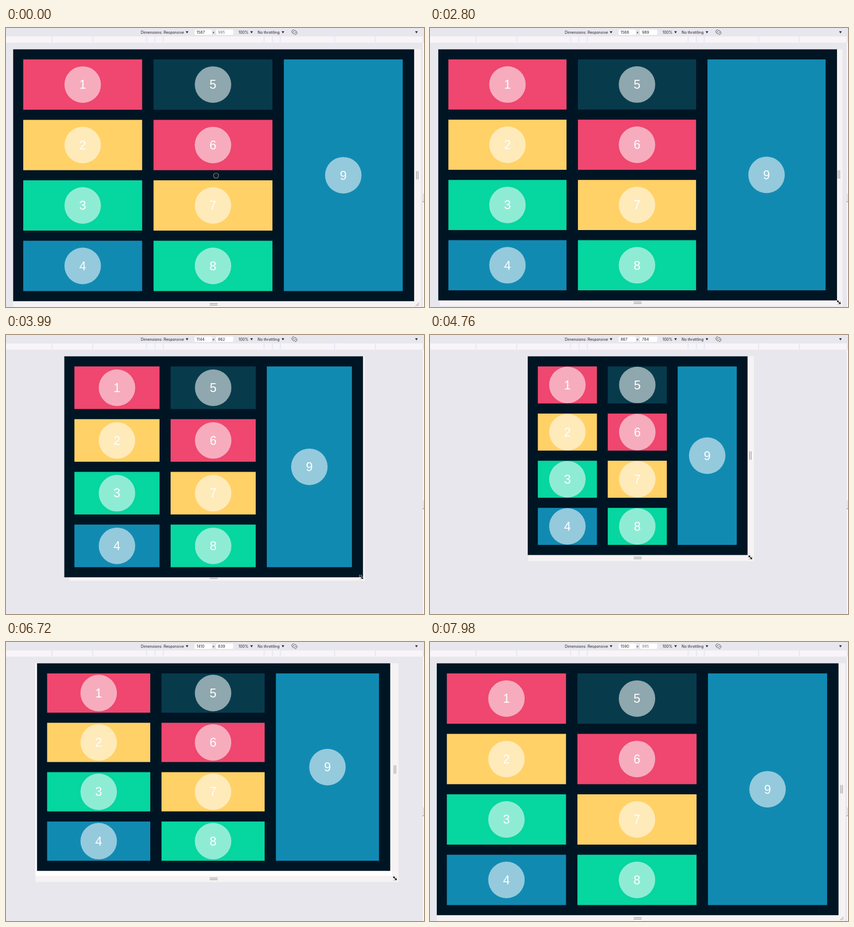
An HTML page with a canvas that plays this animation: 800x533 px, repeating every 8000 ms.

```html
<!DOCTYPE html>
<html lang="en">
<head>
<meta charset="utf-8">
<style>
  html, body { margin: 0; overflow: hidden; background: #e8e7ee; }
  canvas { display: block; }
</style>
</head>
<body>
<canvas id="stage"></canvas>
<script>
const canvas = document.getElementById('stage');
const ctx = canvas.getContext('2d');
const ratio = window.devicePixelRatio || 1;
canvas.width = 800 * ratio;
canvas.height = 533 * ratio;
canvas.style.width = '800px';
canvas.style.height = '533px';

const LOOP = 8000, STEP = 70;
const SCALE = 0.4836, CENTER = 397.4, TOP = 40.7, PAD = 40 * SCALE;
const PINK = '#ef476f', YELLOW = '#ffd166', GREEN = '#06d6a0', BLUE = '#118ab2', TEAL = '#073b4c';
const COLORS = [PINK, YELLOW, GREEN, BLUE, TEAL, PINK, YELLOW, GREEN, BLUE];
const TICKS = [88, 166, 269, 285, 301, 494, 510, 525, 629, 707];

// Drag path: time, width, height, then the speed of each per step
const DRAG = [
  [2590, 1587, 995, 0, 0],
  [3430, 1398, 937, -19, -6],
  [4760, 867, 784, 0, 0],
  [5880, 1112, 653, 14, -2],
  [6720, 1410, 839, 8, 18],
  [7560, 1590, 995, 0, 0]
];

function hermite(p, q, m, n, u) {
  const v = 1 - u;
  return p * (1 + 2 * u) * v * v + m * u * v * v + q * u * u * (3 - 2 * u) - n * u * u * v;
}

function sizeAt(t) {
  const last = DRAG[DRAG.length - 1];
  t = Math.min(Math.max(t, DRAG[0][0]), last[0]);
  const i = Math.max(1, DRAG.findIndex(k => t <= k[0]));
  const a = DRAG[i - 1], b = DRAG[i];
  const span = b[0] - a[0], u = (t - a[0]) / span, steps = span / STEP;
  const [w, h] = [1, 2].map(j => hermite(a[j], b[j], a[j + 2] * steps, b[j + 2] * steps, u));
  return { w: Math.round(w), h: Math.round(h) };
}

function rect(x, y, w, h, color) {
  ctx.fillStyle = color;
  ctx.fillRect(x, y, w, h);
}

function path(color, width, ...lines) {
  ctx.strokeStyle = color;
  ctx.lineWidth = width;
  ctx.beginPath();
  for (const [x1, y1, x2, y2] of lines) {
    ctx.moveTo(x1, y1);
    ctx.lineTo(x2, y2);
  }
  ctx.stroke();
}

function label(text, x, color = '#222') {
  ctx.font = '7.2px Inter, sans-serif';
  ctx.textAlign = 'left';
  ctx.textBaseline = 'alphabetic';
  ctx.fillStyle = color;
  ctx.fillText(text, x, 10.6);
}

function caret(x) {
  ctx.fillStyle = '#222';
  ctx.beginPath();
  ctx.moveTo(x - 2.5, 6.2);
  ctx.lineTo(x + 2.5, 6.2);
  ctx.lineTo(x, 10.3);
  ctx.fill();
}

function input(x, text, color) {
  ctx.fillStyle = '#fff';
  ctx.beginPath();
  ctx.roundRect(x, 3, 33, 10, 2);
  ctx.fill();
  label(text, x + 3.8, color);
}

function rotateIcon() {
  ctx.save();
  ctx.translate(552, 8);
  ctx.rotate(Math.PI / 4);
  ctx.strokeStyle = '#444';
  ctx.lineWidth = 0.9;
  ctx.strokeRect(-1.8, -3.6, 3.6, 7.2);
  for (const start of [-0.9, Math.PI - 0.9]) {
    ctx.beginPath();
    ctx.arc(0, 0, 5, start, start + 1.5);
    ctx.stroke();
  }
  ctx.restore();
}

function toolbar(size) {
  rect(0, 0, 800, 533, '#e8e7ee');
  rect(0, 16, 798, 12, '#f8f4f7');
  for (const x of TICKS) rect(x - 0.5, 16, 1, 11, '#cfe0f8');
  rect(798, 28, 2, 505, '#fbfafc');
  rect(797.5, 316, 2.5, 16, '#e4e3ea');
  rect(797, 331.5, 3, 1, '#888');
  label('Dimensions: Responsive', 258);
  caret(346.5);
  input(361, size.w, '#222');
  label('×', 394.8);
  input(402, size.h, size.h >= 995 ? '#777' : '#222');
  label('100%', 445);
  caret(470);
  label('No throttling', 481.5);
  caret(530);
  rotateIcon();
  caret(785.5);
}

function frame(w, h) {
  const left = CENTER - w / 2, right = left + w, bottom = TOP + h, mid = TOP + h / 2;
  rect(left, TOP, w + 13, h + 12, '#f7f2f3');
  rect(left, TOP, w, h, '#fff');
  path('#888', 1,
    [right + 4.5, mid - 8, right + 4.5, mid + 8],
    [right + 7.5, mid - 8, right + 7.5, mid + 8],
    [CENTER - 7.5, bottom + 4.5, CENTER + 7.5, bottom + 4.5],
    [CENTER - 7.5, bottom + 7.5, CENTER + 7.5, bottom + 7.5],
    [right + 3, bottom + 9.5, right + 9.5, bottom + 3],
    [right + 6.5, bottom + 9.5, right + 9.5, bottom + 6.5]);
}

function page(w, h) {
  const left = CENTER - w / 2;
  const pitchX = (w - PAD) / 3, pitchY = (h - PAD) / 4;
  const cellW = (w - PAD) * 0.33 - PAD;
  rect(left, TOP, w, h, '#001524');
  COLORS.forEach((color, i) => {
    const x = left + PAD + Math.floor(i / 4) * pitchX;
    const y = TOP + PAD + (i % 4) * pitchY;
    const cellH = (i === 8 ? h - PAD : pitchY) - PAD;
    const cx = x + cellW / 2, cy = y + cellH / 2;
    rect(x, y, cellW, cellH, color);
    ctx.fillStyle = 'rgba(255,255,255,.55)';
    ctx.beginPath();
    ctx.arc(cx, cy, 34.9, 0, 7);
    ctx.fill();
    ctx.fillStyle = '#fff';
    ctx.font = '23.5px "Liberation Sans", Arial, sans-serif';
    ctx.textAlign = 'center';
    ctx.fillText(i + 1, cx, cy + 8.3);
  });
}

function resizeCursor(x, y, angle) {
  ctx.save();
  ctx.translate(x, y);
  ctx.rotate(angle);
  ctx.beginPath();
  ctx.moveTo(-5, 0);
  for (const [px, py] of [[-2, -2.6], [-2, -0.7], [2, -0.7], [2, -2.6], [5, 0],
                          [2, 2.6], [2, 0.7], [-2, 0.7], [-2, 2.6]]) ctx.lineTo(px, py);
  ctx.closePath();
  ctx.strokeStyle = '#fff';
  ctx.lineWidth = 1;
  ctx.stroke();
  ctx.fillStyle = '#111';
  ctx.fill();
  ctx.restore();
}

function ease(t, from, to) {
  const u = Math.min(1, Math.max(0, (t - from) / (to - from)));
  return u * u * (3 - 2 * u);
}

function cursor(t, w, h) {
  if (t > 7630) return;
  const cornerX = CENTER + w / 2 + 6, cornerY = TOP + h + 5;
  if (t >= 2100) {
    const u = ease(t, 2030, 2380);
    resizeCursor(800 + (cornerX - 800) * u, 522 + (cornerY - 522) * u, Math.PI / 4);
    return;
  }
  const u = ease(t, 0, 420), x = 402 + 398 * u, y = 282 + 240 * u;
  if (x > 781) return resizeCursor(x, y, 0);
  ctx.fillStyle = 'rgba(40,40,40,.4)';
  ctx.strokeStyle = '#777b80';
  ctx.lineWidth = 1.2;
  ctx.beginPath();
  ctx.arc(x, y, 5, 0, 7);
  ctx.fill();
  ctx.stroke();
}

function draw(now) {
  const t = Math.floor((now % LOOP) / STEP) * STEP;
  const size = sizeAt(t), painted = sizeAt(t - STEP); // page repaints one step late
  const w = size.w * SCALE, h = size.h * SCALE;
  ctx.setTransform(ratio, 0, 0, ratio, 0, 0);
  toolbar(size);
  frame(w, h);
  page(painted.w * SCALE, painted.h * SCALE);
  cursor(t, w, h);
}

const start = performance.now();
function tick() {
  draw(performance.now() - start);
  requestAnimationFrame(tick);
}
tick();
</script>
</body>
</html>
```
